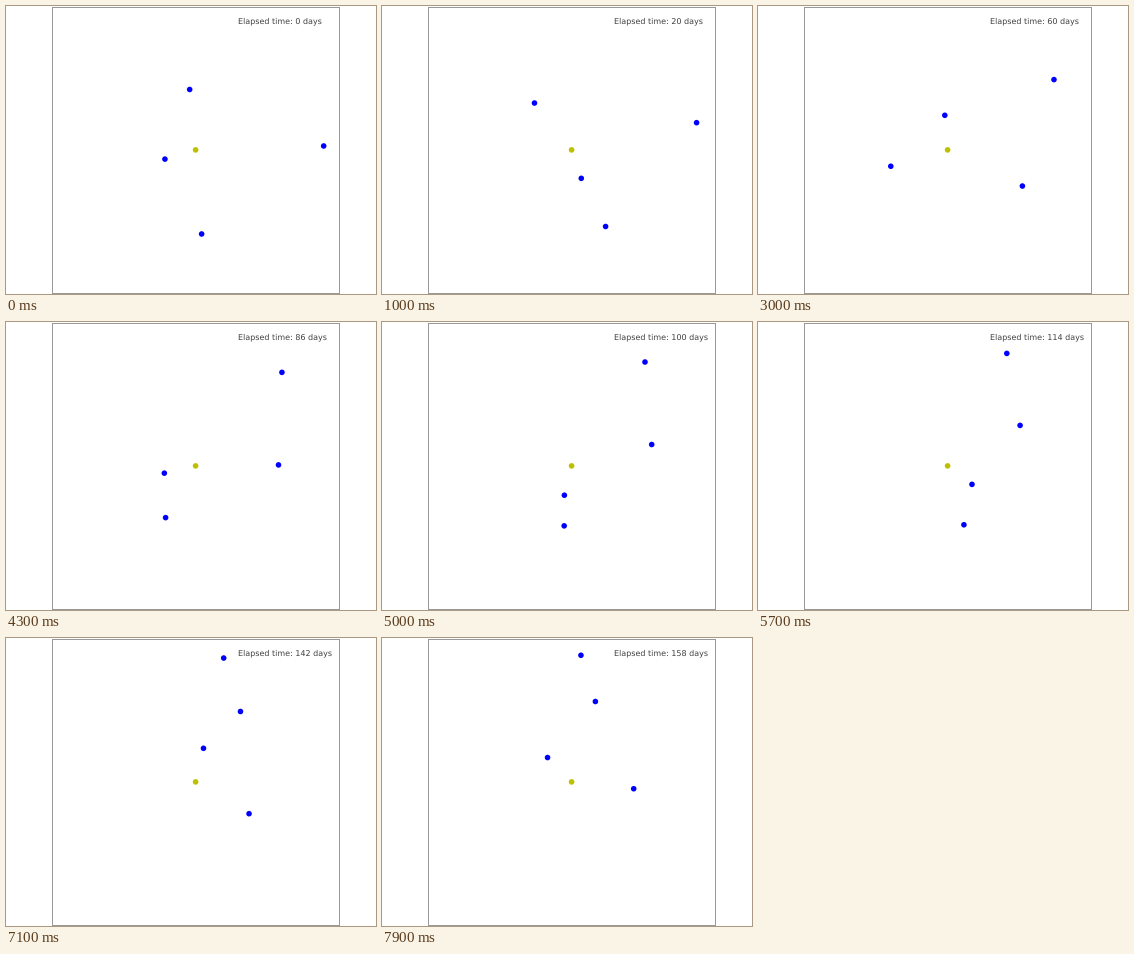
Animation, 370 px wide and 288 px high, one loop 8 s. Source, as a matplotlib script:

```python
import numpy as np
import matplotlib.pyplot as plt
from matplotlib.animation import FuncAnimation

W, H, DPI = 370, 288, 72
SIDE, CX, CY = 286.6, 189.6, 143.9    # plot box in pixels
LIMIT = 1.7                           # half width in AU
FRAMES, INTERVAL, STEP = 80, 100, 2   # STEP in days
GM = (2 * np.pi / 365.25) ** 2        # AU^3 / day^2
DOT = 2.8 * 2 * LIMIT / SIDE          # dot radius in AU


def simulate(radii, degrees):
    """Planets leave circular orbits in fixed time steps; x + iy per step."""
    heading = np.exp(1j * np.radians(degrees))
    pos = np.array(radii) * heading
    vel = 1j * heading * np.sqrt(GM / np.array(radii))
    track = []
    for _ in range(FRAMES):
        track.append(pos)
        vel = vel - GM * pos / abs(pos) ** 3 * STEP
        pos = pos + vel * STEP
    return track


track = simulate([0.38, 0.72, 1.0, 1.52], [196.7, 95.6, -85.9, 1.75])

plt.rcParams.update({"font.family": "DejaVu Sans", "text.hinting": "none"})
fig = plt.figure(figsize=(W / DPI, H / DPI), dpi=DPI, facecolor="white")
ax = fig.add_axes([(CX - SIDE / 2) / W, 1 - (CY + SIDE / 2) / H,
                   SIDE / W, SIDE / H])
ax.set(xlim=(-LIMIT, LIMIT), ylim=(-LIMIT, LIMIT), xticks=[], yticks=[])
for spine in ax.spines.values():
    spine.set(linewidth=1, color="0.6")


def add_dot(color):
    return ax.add_patch(plt.Circle((0, 0), DOT, color=color, lw=0))


add_dot("y")
planets = [add_dot("b") for _ in track[0]]
label = ax.text(0.648, 0.943, "", transform=ax.transAxes,
                fontsize=8, color="0.25")


def update(frame):
    for dot, pos in zip(planets, track[frame]):
        dot.center = pos.real, pos.imag
    label.set_text(f"Elapsed time: {frame * STEP} days")
    return [*planets, label]


anim = FuncAnimation(fig, update, frames=FRAMES, interval=INTERVAL,
                     repeat=True, repeat_delay=0)
plt.show()
```
